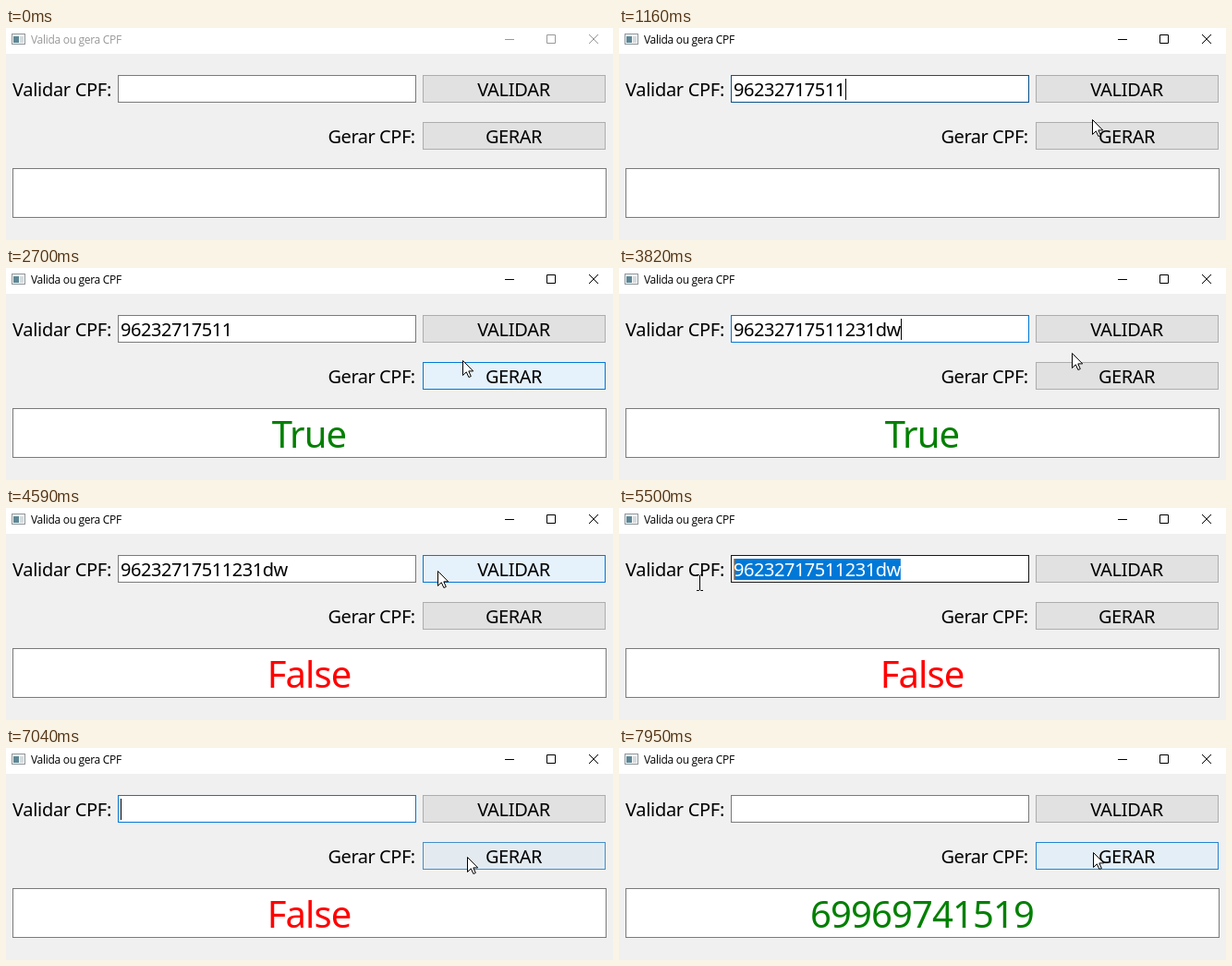
An HTML page that plays this animation: 657x230 px, repeating every 8 s.

```html
<!DOCTYPE html>
<html lang="pt">
<head>
<meta charset="utf-8">
<title>Valida ou gera CPF</title>
<style>
html, body { margin: 0; width: 100%; height: 100%; overflow: hidden; background: #f0f0f0; }
svg { display: block; }
text { font: 20px "Noto Sans", "Open Sans", sans-serif; letter-spacing: -.46px; white-space: pre; }
#title { font: 12px "Open Sans", "Noto Sans", sans-serif; letter-spacing: -.3px; }
#output { font-size: 40px; letter-spacing: -.9px; text-anchor: middle; }
.label { letter-spacing: -.3px; }
.button { text-anchor: middle; }
</style>
</head>
<body>
<svg width="657" height="230" viewBox="0 0 657 230">
  <rect width="657" height="28" fill="#fff"/>
  <rect x="6.5" y="6.5" width="14" height="11" fill="#f4f6f7" stroke="#8f9599"/>
  <rect x="8" y="9" width="6" height="7" fill="#5d8795"/>
  <rect x="15" y="9" width="4" height="7" fill="#d5dadd"/>
  <text id="title" x="27" y="17">Valida ou gera CPF</text>
  <path id="controls" fill="none" d="M540 12.5h10M585.5 7.5h9v9h-9zM631 7l10 10M641 7l-10 10"/>

  <text class="label" x="7" y="74">Validar CPF:</text>
  <text x="348.5" y="125">Gerar CPF:</text>

  <rect id="field" x="121.5" y="51.5" width="322" height="29" fill="#fff"/>
  <rect id="mark" y="55" height="23" fill="#0078d7"/>
  <text x="124" y="74"><tspan id="plain"></tspan><tspan id="chosen" fill="#fff"></tspan></text>
  <rect id="caret" y="55" width="1" height="23"/>

  <rect id="validate" x="451.5" y="51.5" width="197" height="29"/>
  <text class="button label" x="549.5" y="74">VALIDAR</text>
  <rect id="generate" x="451.5" y="102.5" width="197" height="29"/>
  <text class="button" x="549.5" y="125">GERAR</text>

  <rect x="7.5" y="152.5" width="642" height="53" fill="#fff" stroke="#7a7a7a"/>
  <text id="output" x="328" y="195"></text>

  <g id="pointer">
    <path id="arrow" fill="#fff" stroke="#000" d="M.5 .5v16l3.8-3.7 2.6 5.7 2.4-1-2.5-5.6h4.9z"/>
    <path id="beam" fill="none" stroke="#000" d="M-3 -7.5h2.5l1 1 1-1H4M.5 -7V9M-3 9.5h2.5l1-1 1 1H4"/>
  </g>
</svg>
<script>
const LOOP = 8000, CPF = '96232717511', EXTRA = '231dw', MADE = '69969741519';
const PASTE = 820, TYPE = 3320, KEY = 85, DRAG = 5050, RELEASE = 5850, CLEAR = 5950;
const $ = id => document.getElementById(id);
const clamp = (v, low, high) => Math.max(low, Math.min(high, v));

// Pointer stops: arrival, x, y, rest. It moves straight from one to the next.
const stops = [
  [130, 330, 171, 0], [550, 300, 66, 470], [1110, 512, 99, 50], [1350, 545, 70, 510],
  [2150, 468, 145, 0], [2570, 495, 100, 130], [3000, 310, 67, 450], [3750, 490, 92, 70],
  [4060, 540, 68, 390], [4900, 306, 68, 150], [5430, 87, 80, 420], [6600, 335, 129, 80],
  [7040, 499, 118, 210], [7500, 353, 158, 40], [7950, 513, 113, 50]
];
const clicks = [
  [550, 'field'], [1500, 'validate'], [2980, 'field'],
  [4310, 'validate'], [DRAG, 'field'], [7180, 'generate']
];

function pointerAt(t) {
  const i = Math.max(0, stops.findLastIndex(s => s[0] <= t));
  const [arrive, x, y, rest] = stops[i], next = stops[i + 1];
  if (!next) return [x, y];
  const leave = arrive + rest, p = clamp((t - leave) / (next[0] - leave), 0, 1);
  return [x + (next[1] - x) * p, y + (next[2] - y) * p];
}

const lastClick = t => clicks.findLast(c => c[0] <= t) || [-LOOP, ''];
const dragging = t => t >= DRAG && t < RELEASE;

function hovers(id, t) {
  if (dragging(t)) return id === 'field';
  const [x, y] = pointerAt(t), box = $(id);
  const left = +box.getAttribute('x'), top = +box.getAttribute('y');
  return x > left && x < left + +box.getAttribute('width') && y > top - 3 && y < top + 29;
}

// A state change fades in over 200 ms: the share of that time it has held.
function fade(test, t) {
  let held = 0;
  for (let k = 0; k < 10; k++) held += test(t - k * 20);
  return held / 10;
}

const mix = (a, b, p) => a.map((v, i) => v + (b[i] - v) * p);
const rgb = c => `rgb(${c.map(Math.round)})`;

function drawButton(id, t) {
  const [time, target] = lastClick(t), box = $(id);
  const pressed = target === id && t - time < 70;
  const level = fade(s => hovers(id, s), t);
  const fill = mix([225, 225, 225], [229, 241, 251], level);
  const edge = mix([173, 173, 173], [0, 120, 215], level);
  box.setAttribute('fill', pressed ? '#cce4f7' : rgb(fill));
  box.setAttribute('stroke', pressed ? '#005499' : rgb(edge));
}

function fieldText(t) {
  if (t < PASTE || t >= CLEAR) return '';
  return CPF + EXTRA.slice(0, Math.max(0, Math.floor((t - TYPE) / KEY) + 1));
}

function drawField(t, x) {
  const text = fieldText(t), end = text.length;
  const cut = t >= DRAG ? clamp(Math.round((x - 124) / 11.3), 0, end) : end;
  const marked = cut < end;
  $('plain').textContent = text.slice(0, cut);
  $('chosen').textContent = text.slice(cut);
  const start = 124 + (cut ? $('plain').getComputedTextLength() : 0);
  $('mark').setAttribute('x', start);
  $('mark').setAttribute('width', marked ? $('chosen').getComputedTextLength() : 0);

  const focused = s => lastClick(s)[1] === 'field';
  const edge = mix([122, 122, 122], [0, 120, 215], fade(focused, t));
  $('field').setAttribute('stroke', rgb(mix(edge, [23, 23, 23], fade(s => hovers('field', s), t))));

  // The caret blinks anew after each click or edit.
  const edits = [lastClick(t)[0], PASTE, TYPE, TYPE + KEY * 4, CLEAR];
  const since = t - Math.max(...edits.filter(e => e <= t));
  const caret = $('caret');
  caret.setAttribute('x', Math.round(start));
  caret.setAttribute('fill', marked ? '#ff8728' : '#000');
  caret.style.display = focused(t) && since % 1060 < 530 ? '' : 'none';
}

function drawOutput(t) {
  const [time, button] = clicks.findLast(c => c[0] + 70 <= t && c[1] !== 'field') || [0, ''];
  const valid = /^\d{11}$/.test(fieldText(time));
  const answers = { validate: valid ? 'True' : 'False', generate: MADE };
  $('output').textContent = answers[button] || '';
  $('output').setAttribute('fill', button === 'validate' && !valid ? '#f00' : '#008000');
}

function drawPointer(t, x, y) {
  const beam = hovers('field', t);
  $('pointer').style.display = t < stops[0][0] ? 'none' : '';
  $('pointer').setAttribute('transform', `translate(${Math.round(x)} ${Math.round(y)})`);
  $('beam').style.display = beam ? '' : 'none';
  $('arrow').style.display = beam ? 'none' : '';
}

function draw(t) {
  const [x, y] = pointerAt(t), ink = t < clicks[0][0] ? '#999' : '#000';
  $('title').setAttribute('fill', ink);
  $('controls').setAttribute('stroke', ink);
  drawButton('validate', t);
  drawButton('generate', t);
  drawField(t, x);
  drawOutput(t);
  drawPointer(t, x, y);
}

const begin = performance.now();
function tick() {
  draw((performance.now() - begin) % LOOP);
  requestAnimationFrame(tick);
}
tick();
</script>
</body>
</html>
```
